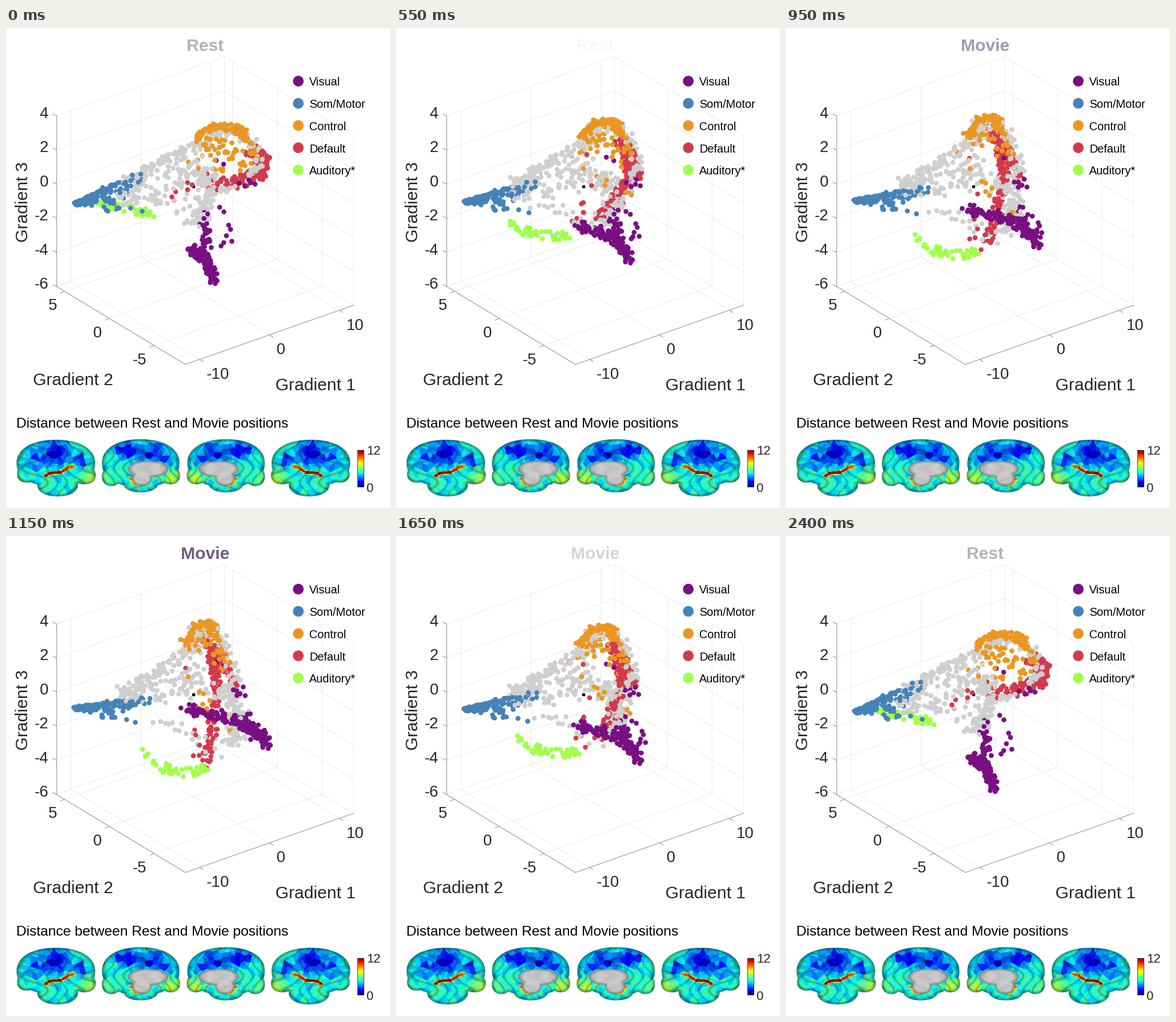
Recreate the animation shown at these times as a matplotlib script. Size 670 px wide and 836 px high, loop 2450 ms.

```python
import numpy as np
import matplotlib.pyplot as plt
from matplotlib.animation import FuncAnimation
from matplotlib.patches import Circle, Rectangle

W, H, DPI = 670, 836, 100
FRAMES, HALF, POSE = 49, 24, 23
PX = 72 / DPI

PURPLE, BLUE, ORANGE = "#780f82", "#4583b7", "#eb9622"
RED, GREEN, GREY = "#d23a4c", "#a0ff4b", "#cfcfcf"
INK, GRID, AXIS = "#262626", "#ebebeb", "#8c8c8c"

rng = np.random.default_rng(12)
plt.rcParams["font.family"] = "Liberation Sans"
fig = plt.figure(figsize=(W / DPI, H / DPI), dpi=DPI, facecolor="white")
ax = fig.add_axes([0, 0, 1, 1])


def label(x, y, s, size, ha="center", color=INK, **kw):
    return ax.text(x, y, s, fontsize=size * PX, ha=ha, va="baseline",
                   color=color, rotation_mode="anchor", **kw)


def line(p, q, color, z=1):
    ax.plot([p[0], q[0]], [p[1], q[1]], color=color, lw=PX, zorder=z)


# ---------- axes box: three floor corners and a height span everything ----------
LEFT, FRONT, RIGHT = np.array([(88, 450), (313, 586), (606, 483)])
SIDE, DEPTH, UP = RIGHT - FRONT, LEFT - FRONT, np.array([0, -297])
BACK = LEFT + SIDE


def draw_box():
    for value in range(-6, 5, 2):
        lift = UP * (value + 6) / 10
        line(LEFT + lift, BACK + lift, GRID)
        line(BACK + lift, RIGHT + lift, GRID)
        p = LEFT + lift
        line(p, p + (-6, -3), AXIS, 2)
        label(74, p[1] + 4, str(value), 27.5, "right")
    for value in (-10, 0, 10):
        p = FRONT + SIDE * (0.501 + 0.0416 * value)
        line(p, p + DEPTH, GRID)
        line(p + DEPTH, p + DEPTH + UP, GRID)
        line(p, p + (6, 4), AXIS, 2)
        label(p[0] + 12, p[1] + 34, str(value), 27.5, "left")
    for value in (-5, 0, 5):
        p = FRONT + DEPTH * (0.591 + 0.0694 * value)
        line(p, p + SIDE, GRID)
        line(p + SIDE, p + SIDE + UP, GRID)
        line(p, p + (-7, 3), AXIS, 2)
        label(p[0] - 13, p[1] + 33, str(value), 27.5, "right")
    line(BACK, BACK + UP, GRID)
    line(RIGHT, RIGHT + UP, GRID)
    line(LEFT, LEFT + UP, AXIS, 2)
    line(LEFT, FRONT, AXIS, 2)
    line(FRONT, RIGHT, AXIS, 2)
    label(117, 622, "Gradient 2", 30)
    label(540, 631, "Gradient 1", 30)
    label(38, 303, "Gradient 3", 30, rotation=90)


def draw_legend():
    rows = [(PURPLE, "Visual"), (BLUE, "Som/Motor"), (ORANGE, "Control"),
            (RED, "Default"), (GREEN, "Auditory*")]
    for i, (color, name) in enumerate(rows):
        y = 92.5 + 38.7 * i
        ax.add_patch(Circle((510, y), 9.3, color=color, lw=0, zorder=6))
        label(529, y + 8, name, 20, "left", "black")


# ---------- point cloud: each point glides between two poses ----------
start, stop, colors, order = [], [], [], []
LAYER = {GREEN: 0, RED: 0.2, GREY: 0.3, BLUE: 0.4, ORANGE: 0.4, PURPLE: 0.6}


def store(color, a, b):
    start.append(a)
    stop.append(b)
    colors.extend([color] * len(a))
    order.append(LAYER[color] + 0.6 * rng.random(len(a)))


def arc(knots, u):
    """Parabola through three points."""
    a, b, c = np.array(knots, float)
    u = u[:, None]
    return (1 - u) * (1 - 2 * u) * a + 4 * u * (1 - u) * b + u * (2 * u - 1) * c


def ribbon(color, n, spread, rest, movie, shape=(1, 1)):
    u = rng.beta(*shape, n)
    noise = np.clip(rng.normal(0, 1, (n, 2)), -1.8, 1.8)
    store(color, arc(rest, u) + noise * spread[0],
          arc(movie, u) + noise * spread[1])


def fan(color, n, rest, movie):
    u = rng.beta(0.8, 2.1, (n, 1))
    v = rng.beta(0.5, 1.6, (n, 1))
    noise = rng.normal(0, 1.5, (n, 2))
    poses = []
    for tip, top, low in (np.array(rest), np.array(movie)):
        poses.append(tip + u * ((1 - v) * (top - tip) + v * (low - tip)) + noise)
    store(color, *poses)


ribbon(GREEN, 46, (4, 4), [(160, 305), (195, 311), (288, 332)],
       [(229, 365), (298, 411), (371, 390)], (1.8, 1.8))

fan(BLUE, 170, [(122, 306), (262, 236), (270, 350)],
    [(121, 300), (285, 275), (245, 350)])

ribbon(RED, 150, (7, 5), [(425, 212), (441, 250), (350, 275)],
       [(348, 172), (366, 270), (346, 398)], (1, 1.2))
ribbon(RED, 40, (2.5, 4), [(438, 215), (446, 240), (447, 265)],
       [(370, 203), (386, 232), (402, 262)])
ribbon(RED, 9, (10, 7), [(350, 195), (318, 275), (270, 289)],
       [(300, 188), (328, 345), (342, 400)])

ribbon(ORANGE, 115, (4.5, 5.5), [(335, 187), (397, 175), (436, 224)],
       [(317, 184), (350, 156), (377, 207)])
ribbon(ORANGE, 40, (12, 8), [(332, 212), (380, 208), (424, 240)],
       [(302, 198), (345, 182), (393, 250)])
ribbon(ORANGE, 9, (4, 8), [(327, 250), (380, 245), (418, 238)],
       [(322, 243), (354, 292), (405, 347)])

ribbon(GREY, 130, (6, 9), [(203, 271), (300, 219), (390, 174)],
       [(194, 277), (290, 222), (350, 152)])
ribbon(GREY, 80, (14, 12), [(200, 292), (290, 264), (352, 215)],
       [(205, 272), (300, 262), (350, 225)])
ribbon(GREY, 95, (9, 10), [(322, 255), (354, 275), (326, 348)],
       [(342, 272), (400, 292), (395, 366)])
ribbon(GREY, 18, (13, 10), [(205, 295), (290, 302), (325, 330)],
       [(250, 318), (320, 340), (370, 388)])
ribbon(GREY, 75, (5, 6), [(392, 174), (442, 240), (350, 288)],
       [(350, 148), (396, 245), (390, 365)])

ribbon(PURPLE, 125, (4.5, 5), [(320, 387), (343, 398), (361, 439)],
       [(305, 302), (395, 320), (454, 363)], (1.1, 0.8))
ribbon(PURPLE, 36, (6, 7), [(344, 322), (350, 360), (346, 402)],
       [(420, 318), (425, 332), (438, 350)])
ribbon(PURPLE, 8, (6, 4), [(368, 302), (385, 345), (374, 402)],
       [(428, 322), (448, 340), (453, 362)])
ribbon(PURPLE, 8, (4, 5), [(362, 218), (400, 258), (440, 272)],
       [(363, 206), (395, 250), (415, 285)])

A, B = np.vstack(start), np.vstack(stop)
rank = np.argsort(np.concatenate(order))
A, B, C = A[rank], B[rank], np.array(colors)[rank]

# keep the centre mark uncovered through the middle of the path
CENTRE = np.array([327, 276.5])
mid = np.linspace(0.25, 0.8, 12)[:, None, None]
clear = (np.linalg.norm(A + (B - A) * mid - CENTRE, axis=2) > 8).all(axis=0)
A, B, C = A[clear], B[clear], C[clear]


# ---------- brain maps: unions of ellipses, coloured by parcel ----------
def inside_depth(x, y, lobes):
    """Rough distance inside the union of (cx, cy, rx, ry) lobes."""
    depths = [(1 - np.abs((x - cx) / rx) ** 2.2 - np.abs((y - cy) / ry) ** 2.2)
              * min(rx, ry) / 2 for cx, cy, rx, ry in lobes]
    return np.max(depths, axis=0)


def bumps(x, y, spots):
    """Base distance plus (cx, cy, radius, height) bumps."""
    return 4.6 + sum(h * np.exp(-((x - cx) / r) ** 2 - ((y - cy) / (0.7 * r)) ** 2)
                     for cx, cy, r, h in spots)


def streak_heat(x, y, a, b, width):
    """1 on a jagged segment, falling to 0 beside it."""
    x, y = np.round(x / 2.5) * 2.5, np.round(y / 2.5) * 2.5
    dx, dy = b[0] - a[0], b[1] - a[1]
    t = np.clip(((x - a[0]) * dx + (y - a[1]) * dy) / (dx * dx + dy * dy), 0, 1)
    d = np.hypot(x - a[0] - t * dx, y - a[1] - t * dy + 2 * np.sin(9 * t))
    return np.clip(1.6 - d / width, 0, 1) * (1 - 0.35 * t ** 2)


def brain(lobes, spots, streak, core=()):
    x0 = min(cx - rx for cx, _, rx, _ in lobes) - 1
    x1 = max(cx + rx for cx, _, rx, _ in lobes) + 1
    y0 = min(cy - ry for _, cy, _, ry in lobes) - 1
    y1 = max(cy + ry for _, cy, _, ry in lobes) + 1
    x, y = np.meshgrid(np.arange(x0, x1, 0.5) + 0.25, np.arange(y0, y1, 0.5) + 0.25)
    sx, sy = rng.uniform(x0, x1, 200), rng.uniform(y0, y1, 200)
    cell = ((x[..., None] - sx) ** 2 + (y[..., None] - sy) ** 2).argmin(axis=2)
    value = (bumps(sx, sy, spots) + rng.normal(0, 0.5, len(sx)))[cell]
    a, b, width, peak = streak
    heat = streak_heat(x, y, a, b, width)
    value = value + (peak - value) * heat
    rgb = plt.get_cmap("jet")(np.clip(value, 0.8, 11.8) / 12)[..., :3]

    depth = inside_depth(x, y, lobes)
    ridge = np.abs(np.sin(x / 8 + 1.6 * np.sin(y / 8) + 1.2 * np.sin(x / 15)))
    light = np.clip(0.5 + 0.09 * depth, 0, 0.97) * (1 - 0.35 * (1 - ridge) ** 3)
    rgb = rgb * light[..., None]
    if core:
        hollow = inside_depth(x, y, core)
        tone = np.clip(0.5 + 0.08 * hollow, 0, 0.8) * (0.93 + 0.07 * ridge)
        rgb = np.where((hollow > 0)[..., None], tone[..., None], rgb)
    img = np.dstack([np.clip(rgb, 0, 1), np.clip(depth / 0.6, 0, 1)])
    # the other hemisphere is the mirror image
    for pic, l, r in ((img, x0, x1), (img[:, ::-1], 619 - x1, 619 - x0)):
        ax.imshow(pic, extent=(l, r, y1, y0), aspect="auto", zorder=3)


def draw_brains():
    brain([(87, 758, 69, 41), (90, 795, 36, 21), (137, 779, 20, 16), (36, 777, 17, 15)],
          [(88, 742, 25, -4.4), (48, 752, 14, -2.6), (134, 757, 13, -2.6),
           (146, 785, 15, 2.6), (113, 762, 9, 2.5)],
          ((69, 780), (119, 764), 2.6, 12.2))
    brain([(235, 758, 68, 42), (235, 792, 31, 17), (184, 781, 17, 17), (287, 779, 17, 16)],
          [(212, 735, 20, -3.6), (252, 742, 19, -4), (282, 752, 11, -2.3),
           (176, 785, 13, 1.8), (294, 783, 14, 2.4)],
          ((217, 785), (231, 799), 2.4, 10.2),
          [(248, 768, 35, 14), (237, 784, 17, 13)])


def draw_colorbar():
    ramp = np.linspace(1, 0, 128)[:, None]
    ax.imshow(ramp, cmap="jet", extent=(613, 624, 799, 735), aspect="auto", zorder=3)
    ax.add_patch(Rectangle((613, 735), 11, 64, fill=False, ec="#404040",
                           lw=PX, zorder=4))
    label(629, 743, "12", 22, "left")
    label(628, 808, "0", 22, "left")


draw_box()
draw_legend()
label(18, 696, "Distance between Rest and Movie positions", 24.5, "left", "black")
draw_brains()
draw_colorbar()
ax.add_patch(Rectangle(CENTRE - 2.5, 5, 5, color="black", lw=0, zorder=4))
cloud = ax.scatter(A[:, 0], A[:, 1], s=(8.6 * PX) ** 2, c=C, linewidths=0, zorder=5)
rest_title = label(347, 40, "Rest", 30, color="#afb5b4", weight="bold")
movie_title = label(347, 40, "Movie", 30, color="#674e78", weight="bold")
ax.set_xlim(0, W)
ax.set_ylim(H, 0)
ax.axis("off")


def update(k):
    step = HALF - abs(k - HALF)
    cloud.set_offsets(A + (B - A) * step / POSE)
    fade = 1 - 2 * step / HALF
    rest_title.set_alpha(max(fade, 0))
    movie_title.set_alpha(max(-fade, 0))
    return cloud, rest_title, movie_title


anim = FuncAnimation(fig, update, frames=FRAMES, interval=50, repeat=True,
                     repeat_delay=0, blit=False)
plt.show()
```
